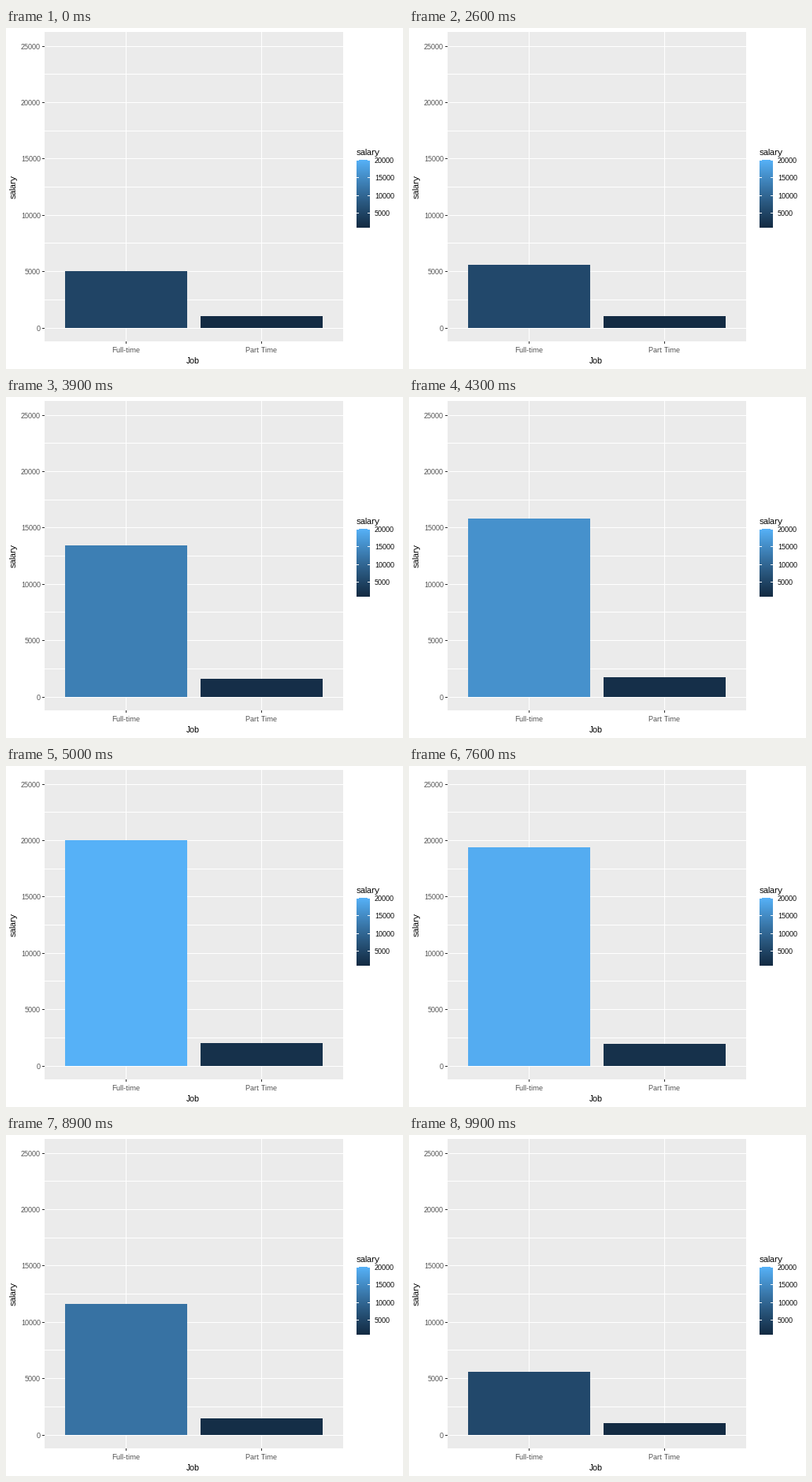
A matplotlib script that plays this animation: 504x432 px, repeating every 10 s.

```python
import math

import numpy as np
import matplotlib.pyplot as plt
from matplotlib.animation import FuncAnimation
from matplotlib.patches import Rectangle

plt.rcParams.update({
    "font.family": "Liberation Sans",
    "text.hinting": "default",
    "text.hinting_factor": 1,
    "toolbar": "None",
})

W, H, DPI = 504, 432, 72
FRAMES, STEP = 100, 100
HOLD, TWEEN = 25, 25
LOW, HIGH = 1000, 20000
BASE, SCALE = 380, 0.01427

RGB_XYZ = np.array([[0.4124564, 0.3575761, 0.1804375],
                    [0.2126729, 0.7151522, 0.0721750],
                    [0.0193339, 0.1191920, 0.9503041]])
WHITE = RGB_XYZ.sum(axis=1)


def to_lab(code):
    c = np.array([int(code[i:i + 2], 16) for i in (1, 3, 5)]) / 255
    lin = np.where(c > 0.04045, ((c + 0.055) / 1.055) ** 2.4, c / 12.92)
    r = RGB_XYZ @ lin / WHITE
    x, y, z = np.where(r > 0.008856, np.cbrt(r), 7.787 * r + 16 / 116)
    return np.array([116 * y - 16, 500 * (x - y), 200 * (y - z)])


def to_rgb(lab):
    y = (lab[0] + 16) / 116
    f = np.array([y + lab[1] / 500, y, y - lab[2] / 200])
    xyz = np.where(f ** 3 > 0.008856, f ** 3, (f - 16 / 116) / 7.787) * WHITE
    lin = np.clip(np.linalg.solve(RGB_XYZ, xyz), 0, 1)
    c = np.where(lin > 0.0031308, 1.055 * lin ** (1 / 2.4) - 0.055, 12.92 * lin)
    return np.clip(c, 0, 1)


DARK, LIGHT = to_lab("#132B43"), to_lab("#56B1F7")


def shade(value):
    """Fill colour for a salary, blended in Lab space."""
    t = min(max((value - LOW) / (HIGH - LOW), 0), 1)
    return to_rgb(DARK + (LIGHT - DARK) * t)


def y_pos(value):
    return math.floor(BASE - value * SCALE)


fig = plt.figure(figsize=(W / DPI, H / DPI), dpi=DPI, facecolor="white")
ax = fig.add_axes([0, 0, 1, 1])
ax.axis("off")


def box(x, y, w, h, color, z=1):
    return ax.add_patch(Rectangle((x, y), w, h, facecolor=color, linewidth=0,
                                  antialiased=False, zorder=z))


def label(x, y, text, size=9, color="black", ha="left", **kw):
    ax.text(x, y, text, fontsize=size, color=color, ha=ha,
            va=kw.pop("va", "baseline"), zorder=5, **kw)


# Panel, grid and axes
LEFT, RIGHT, TOP, BOTTOM = 49, 428, 5, 397
GREY, TICK = "#4D4D4D", "#333333"

box(LEFT, TOP, RIGHT - LEFT, BOTTOM - TOP, "#EBEBEB", 0)
for v in range(0, 25001, 2500):
    y = y_pos(v)
    box(LEFT, y, RIGHT - LEFT, 1, "white")
    if v % 5000 == 0:
        box(LEFT - 3, y, 3, 1, TICK)
        label(44, y + 4, str(v), color=GREY, ha="right")
for x, name in ((152, "Full-time"), (324, "Part Time")):
    box(x, TOP, 1, BOTTOM - TOP, "white")
    box(x, BOTTOM, 1, 3, TICK)
    label(x + 0.5, 411, name, color=GREY, ha="center")

label(237.5, 425, "Job", 11, ha="center")
label(15, 201.5, "salary", 11, ha="right", va="center", rotation=90,
      rotation_mode="default")

# Colour bar
KEY_X, KEY_Y, KEY_W, KEY_H = 445, 167, 17, 86
label(KEY_X, 161, "salary", 11)
ramp = [[shade(v)] for v in np.linspace(HIGH, LOW, KEY_H)]
ax.imshow(ramp, extent=(KEY_X, KEY_X + KEY_W, KEY_Y + KEY_H, KEY_Y),
          aspect="auto", interpolation="nearest", zorder=2)
for v in range(5000, 20001, 5000):
    y = max(KEY_Y, math.floor(166.6 + 86.4 * (HIGH - v) / (HIGH - LOW)))
    box(KEY_X, y, 3, 1, "white", 3)
    box(KEY_X + KEY_W - 3, y, 3, 1, "white", 3)
    label(468, y + 4, str(v))

ax.set_xlim(0, W)
ax.set_ylim(H, 0)

# Bars: (patch, start salary, end salary)
bars = [(box(75, BASE, 155, 0, "black", 4), 5000, 20000),
        (box(247, BASE, 155, 0, "black", 4), 1000, 2000)]


def progress(i):
    """Hold low, rise, hold high, fall: linear tweens."""
    half, k = divmod(i, HOLD + TWEEN)
    t = max(0, k - HOLD) / TWEEN
    return 1 - t if half else t


def draw(i):
    t = progress(i)
    for bar, start, end in bars:
        value = start + (end - start) * t
        y = y_pos(value)
        bar.set_y(y)
        bar.set_height(BASE - y)
        bar.set_facecolor(shade(value))
    return [b[0] for b in bars]


anim = FuncAnimation(fig, draw, frames=FRAMES, interval=STEP,
                     repeat=True, repeat_delay=0, blit=False)
plt.show()
```
